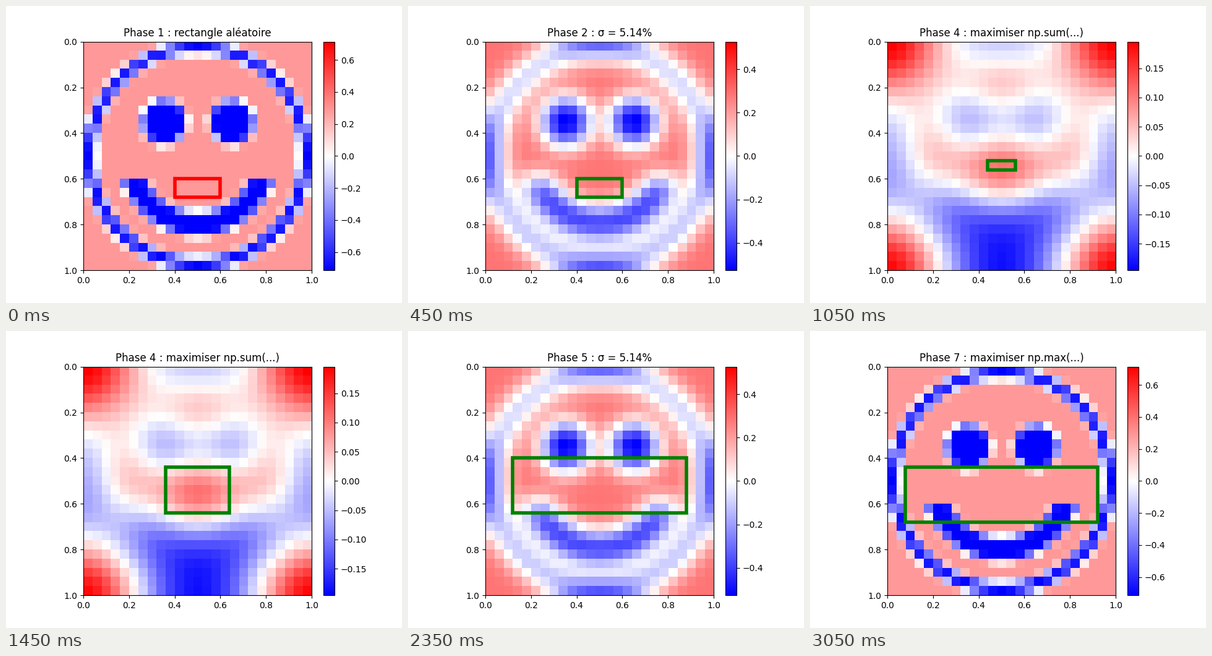
A matplotlib script for the animation above (3150 ms loop, 640 px wide and 480 px high).

```python
import numpy as np
import matplotlib.pyplot as plt
from matplotlib.animation import FuncAnimation
from matplotlib.patches import Rectangle

N = 25          # grid cells per side
SUB = 24        # samples per cell side
TICK = 50       # ms
SIGMA_MAX = 3.0
STEPS = 7       # blur steps from sharp to SIGMA_MAX


def draw_face():
    """Antialiased smiley, 1 = paper and 0 = ink, shifted to zero mean."""
    p = (np.arange(N * SUB) + 0.5) / SUB
    x, y = np.meshgrid(p, p)

    def disc(cx, cy, r):
        return (x - cx) ** 2 + (y - cy) ** 2 < r * r

    outline = disc(12.5, 12.5, 12.5) & ~disc(12.5, 12.44, 11.23)
    eyes = disc(8.8, 8.78, 2.48) | disc(16.25, 8.78, 2.45)
    mouth = disc(12.5, 12.5, 8.72) & ~disc(12.5, 12.5, 6.22) & (y > 15)
    ink = (outline | eyes | mouth).astype(float)
    gray = 1 - ink.reshape(N, SUB, N, SUB).mean(axis=(1, 3))
    return gray - gray.mean()


def blur(img, sigma):
    """Gaussian filter with mirrored borders."""
    if sigma < 1e-6:
        return img
    r = int(4 * sigma + 0.5)
    k = np.exp(-0.5 * (np.arange(-r, r + 1) / sigma) ** 2)
    k /= k.sum()
    for _ in range(2):
        padded = np.pad(img, ((r, r), (0, 0)), mode="symmetric")
        img = sum(w * padded[i:i + N] for i, w in enumerate(k)).T
    return img


# One edge of the box moves by one cell: lower case inwards, upper case outwards.
MOVES = {
    "L": (-1, 0, 0, 0), "l": (1, 0, 0, 0),
    "R": (0, 1, 0, 0), "r": (0, -1, 0, 0),
    "T": (0, 0, -1, 0), "t": (0, 0, 1, 0),
    "B": (0, 0, 0, 1), "b": (0, 0, 0, -1),
}


def build_timeline():
    box = (10, 15, 15, 17)      # left, right, top, bottom
    line = []

    def add(phase, text, step, color="green"):
        line.append((f"Phase {phase} : {text}", step, box, color))

    def sweep(phase, steps):
        for i, step in enumerate(steps):
            s = SIGMA_MAX * step / STEPS
            add(phase, f"σ = {s:.2f}" if i == 0 else f"σ = {100 * s / N:.2f}%", step)

    def climb(phase, name, step, path):
        nonlocal box
        text = f"maximiser np.{name}(...)"
        add(phase, text, step)
        for m in path:
            box = tuple(a + d for a, d in zip(box, MOVES[m]))
            add(phase, text, step)

    for _ in range(6):
        add(1, "rectangle aléatoire", 0, "red")
    sweep(2, range(STEPS))
    climb(3, "mean", STEPS, "bTbTblr")
    climb(4, "sum", STEPS, "BTLRTBLR" + "LR" * 5 + "TLR")
    sweep(5, range(STEPS, 0, -1))
    climb(6, "sum", 0, "tLRB")
    for _ in range(8):
        climb(7, "max", 0, "")
    return line


face = draw_face()
maps = [blur(face, SIGMA_MAX * i / STEPS) for i in range(STEPS + 1)]
timeline = build_timeline()

W, H = 640, 480
SIDE = 369.6
LEFT, BOTTOM = 328 - 0.55 * SIDE, 52.8

fig = plt.figure(figsize=(W / 100, H / 100), dpi=100, facecolor="white")
ax = fig.add_axes([LEFT / W, BOTTOM / H, SIDE / W, SIDE / H])
cax = fig.add_axes([(LEFT + 1.05 * SIDE) / W, BOTTOM / H, 0.05 * SIDE / W, SIDE / H])

im = ax.imshow(face, cmap="bwr", extent=(0, 1, 1, 0), aspect="auto",
               interpolation="nearest")
peak = np.abs(face).max()
im.set_clim(-peak, peak)
fig.colorbar(im, cax=cax)
frame_box = ax.add_patch(Rectangle((0, 0), 1, 1, fill=False, linewidth=4))
title = ax.set_title("")


def update(i):
    text, step, (l, r, t, b), color = timeline[i]
    data = maps[step]
    top = np.abs(data).max()
    im.set_data(data)
    im.set_clim(-top, top)
    frame_box.set_bounds(l / N, t / N, (r - l) / N, (b - t) / N)
    frame_box.set_edgecolor(color)
    title.set_text(text)
    return im, frame_box, title


anim = FuncAnimation(fig, update, frames=len(timeline), interval=TICK,
                     repeat=True, repeat_delay=0, blit=False)
plt.show()
```
